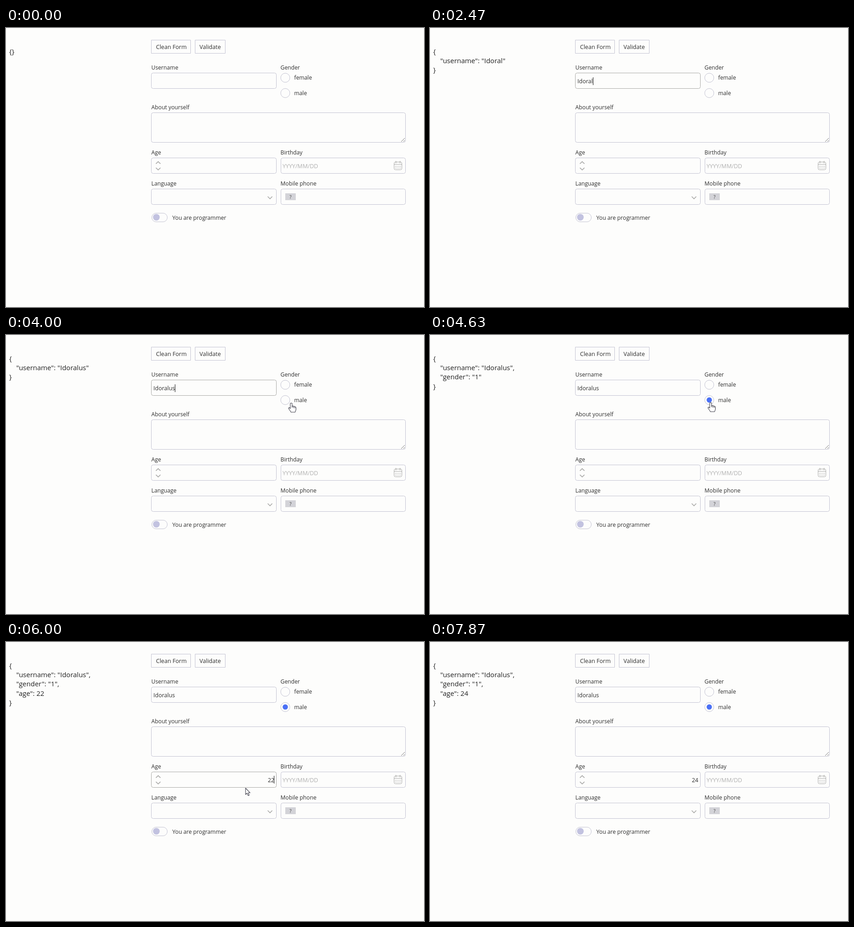
Recreate the animation shown at these times as an HTML page with a canvas. Size 916 px wide and 611 px high, loop 8000 ms.

```html
<!DOCTYPE html>
<html lang="en">
<head>
<meta charset="utf-8">
<title>Form values</title>
<style>
  html, body { margin: 0; width: 100%; height: 100%; overflow: hidden; background: #fdfdfc; }
  canvas { display: block; }
</style>
</head>
<body>
<canvas id="stage" width="916" height="611"></canvas>
<script>
const ctx = document.getElementById('stage').getContext('2d');
const LOOP = 8000;
const BLINK = 535;
const INK = '#2e2e2e', LINE = '#c3c3d2', FOCUS = '#a9a9a6', ICON = '#a8a8a6', PAPER = '#fdfdfc';

const USERNAME = 'Idoralus';
const KEY_TIMES = [1470, 1870, 2070, 2200, 2370, 2470, 2630, 2700];
const AGES = [[5870, '2'], [5980, '22'], [7370, '23'], [7800, '24']];
const NAME_FOCUS = 630, GENDER_CLICK = 4330, AGE_FOCUS = 5470, AGE_BLUR = 7370;

// Pointer stretches: [time, x, y]; hidden between them.
const POINTER = [
  [[3530, 500, 117], [3800, 592, 141], [4000, 625, 149], [4200, 617, 148], [4330, 615, 148],
   [4630, 615, 148], [4780, 588, 200], [4930, 537, 267], [5130, 537, 267], [5270, 541, 292],
   [5870, 541, 292]],
  [[5900, 541, 293], [6000, 525, 320], [6090, 486, 319], [6210, 405, 309], [6330, 343, 299],
   [6530, 343, 299], [6800, 336, 296], [7870, 336, 296]]
];

function text(str, x, y, size = 12.2, color = INK, align = 'left') {
  ctx.font = `${size}px "Open Sans", sans-serif`;
  ctx.fillStyle = color;
  ctx.textAlign = align;
  ctx.fillText(str, x, y);
}

function box(x, y, w, h, radius = 4, stroke = LINE) {
  ctx.beginPath();
  ctx.roundRect(x + 0.5, y + 0.5, w, h, radius);
  ctx.strokeStyle = stroke;
  ctx.lineWidth = 1;
  ctx.stroke();
}

function line(points, color, width) {
  ctx.beginPath();
  points.forEach(([x, y]) => ctx.lineTo(x, y));
  ctx.strokeStyle = color;
  ctx.lineWidth = width;
  ctx.stroke();
}

function disc(x, y, r, fill, stroke) {
  ctx.beginPath();
  ctx.arc(x, y, r, 0, Math.PI * 2);
  if (fill) { ctx.fillStyle = fill; ctx.fill(); }
  if (stroke) { ctx.strokeStyle = stroke; ctx.lineWidth = 1; ctx.stroke(); }
}

function chevron(x, y, dy) {
  line([[x - 5, y - dy], [x, y + dy], [x + 5, y - dy]], ICON, 1.6);
}

function caret(x, y, since) {
  if (Math.floor(since / BLINK) % 2 === 0) {
    ctx.fillStyle = '#111';
    ctx.fillRect(Math.round(x), y, 1, 17);
  }
}

function calendar() {
  box(850, 293, 17, 17, 3, ICON);
  line([[850, 298.5], [868, 298.5]], ICON, 1);
  line([[854.5, 291], [854.5, 296]], ICON, 1.2);
  line([[863.5, 291], [863.5, 296]], ICON, 1.2);
  ctx.fillStyle = ICON;
  for (let i = 0; i < 8; i++) ctx.fillRect(853 + i % 4 * 3.5, 302 + (i >> 2) * 4, 1.5, 1.5);
}

function staticForm() {
  box(318, 26, 86, 29, 0);
  box(414, 26, 66, 29, 0);
  text('Clean Form', 328.7, 45.5, 12.6);
  text('Validate', 424, 45.5, 12.6);

  text('Username', 318.6, 91);
  text('Gender', 601.6, 91);
  text('About yourself', 318.6, 178);
  text('Age', 318.6, 276.5);
  text('Birthday', 601.6, 276.5);
  text('Language', 318.6, 344.5);
  text('Mobile phone', 601.6, 344.5);
  text('You are programmer', 364.6, 419.5);

  disc(612, 109, 10, null, LINE);
  disc(612, 142.5, 10, null, LINE);
  text('female', 631.5, 113);
  text('male', 631.5, 146.5);

  box(318, 185, 557, 65);
  line([[866, 249], [874, 241]], '#777', 1);
  line([[871, 249], [874, 246]], '#777', 1);

  box(602, 284, 273, 34);
  text('YYYY/MM/DD', 606, 306.5, 12.5, '#b0b0b0');
  calendar();
  chevron(333.5, 295, -2.3);
  chevron(333.5, 308.5, 2.3);

  box(318, 352, 274, 34);
  chevron(578.5, 371.5, 2.5);
  box(602, 352, 273, 34);
  ctx.fillStyle = '#d3d3d8';
  ctx.fillRect(612, 362, 23, 15);
  text('?', 623.5, 373.5, 10.5, '#444', 'center');

  box(319, 405, 34, 19, 9.5);
  disc(329.5, 414.5, 7.3, '#c2c2e0');
}

function json(name, gender, age) {
  const fields = [];
  if (name) fields.push(`"username": "${name}"`);
  if (gender) fields.push(`"gender": "${gender}"`);
  if (age) fields.push(`"age": ${age}`);
  const rows = fields.map((f, i) => '    ' + f + (i < fields.length - 1 ? ',' : ''));
  const lines = rows.length ? ['{', ...rows, '}'] : ['{}'];
  lines.forEach((row, i) => text(row, 7, 56.5 + i * 20.43, 15, '#222'));
}

function pointerAt(t) {
  const path = POINTER.find(p => t >= p[0][0] && t < p[p.length - 1][0]);
  if (!path) return null;
  const i = path.findIndex(p => p[0] > t);
  const [t0, x0, y0] = path[i - 1], [t1, x1, y1] = path[i];
  const k = (t - t0) / (t1 - t0);
  return [x0 + (x1 - x0) * k, y0 + (y1 - y0) * k];
}

const HAND = new Path2D('M-2 1Q0-1 2 1V7Q4 5.500 5 7.500Q7 6 8 8.500Q10 7.500 10.500 10V14Q10 17 8.500 20H-.5Q-2 17-5.500 12.500Q-6.500 10-4 10L-2 12Z');
const KNUCKLES = new Path2D('M2 7V10M5 8V11M8 9V11.500');
const ARROW = new Path2D('M0 0V14L3.300 11L5.700 16.500L8 15.500L5.700 10.300H10Z');
const BEAM = new Path2D('M-3-8H-1L0-7L1-8H3M0-7V7M-3 8H-1L0 7L1 8H3');

function pointer(t) {
  const at = pointerAt(t);
  if (!at) return;
  const [x, y] = at;
  const inside = (l, top, r, b) => x >= l && x <= r && y >= top && y <= b;
  const hand = inside(602, 99, 660, 153) || inside(320, 285, 345, 318);
  const beam = inside(318, 98, 593, 133) || inside(318, 185, 876, 251) || inside(318, 284, 593, 318);
  ctx.save();
  ctx.translate(Math.round(x), Math.round(y));
  ctx.lineWidth = 1.1;
  ctx.lineJoin = 'round';
  ctx.strokeStyle = '#3c3c48';
  ctx.fillStyle = '#fff';
  if (!hand && beam) {
    ctx.stroke(BEAM);
  } else {
    ctx.fill(hand ? HAND : ARROW);
    ctx.stroke(hand ? HAND : ARROW);
    if (hand) ctx.stroke(KNUCKLES);
  }
  ctx.restore();
}

function draw(t) {
  const typed = KEY_TIMES.filter(k => t >= k);
  const name = USERNAME.slice(0, typed.length);
  const ages = AGES.filter(a => t >= a[0]);
  const age = ages.length ? ages[ages.length - 1][1] : '';
  const nameFocused = t >= NAME_FOCUS && t < GENDER_CLICK;
  const ageFocused = t >= AGE_FOCUS && t < AGE_BLUR;

  ctx.fillStyle = PAPER;
  ctx.fillRect(0, 0, 916, 611);
  json(name, t >= GENDER_CLICK ? '1' : '', age);
  staticForm();

  box(318, 98, 274, 34, 4, nameFocused ? FOCUS : LINE);
  text(name, 323, 120.5, 12.5);
  if (nameFocused) {
    const last = typed.length ? typed[typed.length - 1] : NAME_FOCUS;
    caret(323 + ctx.measureText(name).width, 108, t - last);
  }

  box(318, 284, 274, 34, 4, ageFocused ? FOCUS : LINE);
  text(age, 588, 306.5, 12.5, INK, 'right');
  if (ageFocused) {
    const last = ages.length ? ages[ages.length - 1][0] : AGE_FOCUS;
    caret(587, 293, t - last);
  }

  if (t >= GENDER_CLICK) {
    const grow = Math.min(1, (t - GENDER_CLICK) / 150);
    disc(612, 142.3, 5.8 * grow, '#4a70f5');
  }
  pointer(t);
}

function tick(now) {
  draw(now % LOOP);
  requestAnimationFrame(tick);
}
requestAnimationFrame(tick);
</script>
</body>
</html>
```
